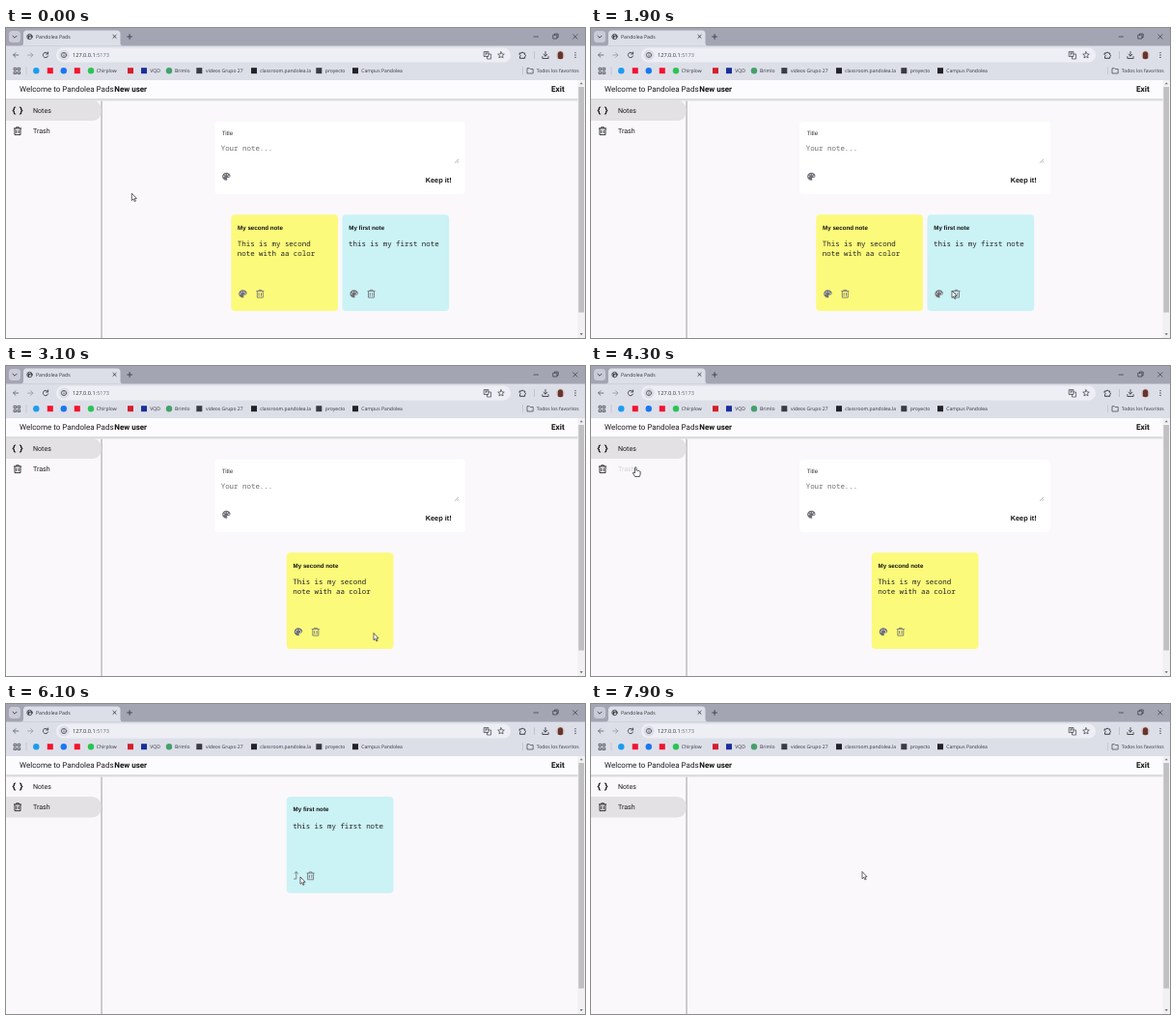
Animation, 600 px wide and 321 px high, one loop 8000 ms. Source, as an HTML page:

```html
<!DOCTYPE html>
<html lang="en">
<head>
<meta charset="utf-8">
<title>Notes demo</title>
<style>
  html, body { margin: 0; width: 100%; height: 100%; overflow: hidden; background: #faf8fb; }
  svg { display: block; width: 100%; height: 100%; }
  text { text-rendering: geometricPrecision; white-space: pre; }
  .ui { font: 5.05px "Open Sans", sans-serif; fill: #30313a; }
  .app { font: 8px Roboto, sans-serif; fill: #1d1b20; }
  .nav { font: 7.1px Roboto, sans-serif; fill: #1d1b20; }
  .bold { font-weight: 700; fill: #111; }
  .head { font: 700 6.2px "Liberation Sans", Arial, sans-serif; fill: #111; }
  .mono { font: 7.45px "Noto Sans Mono", monospace; fill: #222; }
  .line { fill: none; stroke: #3c3d46; stroke-width: .9; stroke-linecap: round; stroke-linejoin: round; }
  .icon { color: #6f6f76; }
</style>
</head>
<body>
<svg viewBox="0 0 600 321" preserveAspectRatio="none">
  <defs>
    <g id="palette">
      <path d="M0-4C-2.4-4-4.2-2.2-4.2 0S-2.3 4 0 4C1.2 4 1.2 3 .8 2.4C.4 1.6 1 1.1 1.8 1.1H2.5C3.7 1.1 4.2.3 4.2-.5C4.2-2.5 2.3-4 0-4Z" fill="currentColor"/>
      <g fill="#fff"><circle cx="-2.5" cy="-.1" r=".65"/><circle cx="-1.2" cy="-2" r=".65"/><circle cx="1.2" cy="-2" r=".65"/><circle cx="2.6" cy="-.3" r=".65"/></g>
    </g>
    <g id="bin" fill="none" stroke="currentColor" stroke-width=".85">
      <path d="M-4-2.9H4M-1.4-3V-4H1.4V-3M-3-2.8V3.8H3V-2.8M-1.2-1.2V2.3M1.2-1.2V2.3"/>
    </g>
    <g id="restore" fill="none" stroke="currentColor" stroke-width=".85">
      <path d="M-2 3.6H.7V-3.8M-1.3-1.8L.7-3.9L2.7-1.8"/>
    </g>
    <g id="arrow">
      <path d="M0 0V7.4L1.7 5.9L2.9 8.5L4.1 8L2.9 5.4H5.1Z" fill="#fff" stroke="#33333b" stroke-width=".75" stroke-linejoin="round"/>
    </g>
    <g id="hand">
      <path d="M-.8 .5Q0-.8 .8 .5V3.6L1.4 3.2L2.3 3.8L3.1 3.5L3.9 4.2Q4.9 3.9 4.9 5V7.4L4 9.8H-.6L-2.7 6.3Q-2.9 5-1.6 5.4L-.8 6.2Z" fill="#fff" stroke="#222229" stroke-width=".75" stroke-linejoin="round"/>
    </g>
  </defs>

  <rect width="600" height="321" fill="#faf8fb"/>

  <!-- tab strip -->
  <rect width="600" height="19" fill="#a3a5b3"/>
  <rect x="3" y="3" width="12" height="12" rx="3.5" fill="#c9cbd6"/>
  <path class="line" d="M7 8.2L9 10.2L11 8.2"/>
  <path d="M15 18.5Q18 18.5 18 15.5V6Q18 2.5 21.5 2.5H115Q118.500 2.5 118.500 6V15.5Q118.500 18.500 121.500 18.500Z" fill="#dddfe8"/>
  <circle class="line" cx="24.500" cy="9" r="2.700"/>
  <path d="M22.500 8L24 7.200L25 8.400L24 10L24.300 11.400L23 10.500ZM25.300 6.700L27 8L26.400 10L25.400 9.200Z" fill="#3c3d46"/>
  <text class="ui" x="31" y="11" style="font-size:5.2px">Pandolea Pads</text>
  <path class="line" d="M110.900 7.200L114.100 10.400M114.100 7.200L110.900 10.400M125.700 9H130.500M128.100 6.600V11.400"/>
  <path class="line" d="M547 9H551.500M567.200 7.200H571V11H567.200ZM568.500 7V6H572.200V9.700H571.200M587.600 6.700L592 11.100M592 6.700L587.600 11.100" style="stroke-width:.75"/>

  <!-- toolbar -->
  <rect y="18.500" width="600" height="35.200" fill="#dddfe8"/>
  <rect x="52" y="20.500" width="471" height="15" rx="7.500" fill="#eeeff5"/>
  <path class="line" d="M12.800 28H7.600M9.900 25.700L7.600 28L9.900 30.300" style="stroke:#666873"/>
  <path class="line" d="M22.700 28H27.900M25.600 25.700L27.900 28L25.600 30.300" style="stroke:#9a9ca8"/>
  <path class="line" d="M43.200 26.300A2.700 2.700 0 1 0 43.600 29M43.600 25V27H41.600"/>
  <circle cx="60" cy="28" r="5.600" fill="#dcdee7"/>
  <circle class="line" cx="60" cy="28" r="2.600" style="stroke-width:.7"/>
  <path class="line" d="M60 27.900V29.300M60 26.600V26.700" style="stroke-width:.7"/>
  <text class="ui" x="69" y="30" style="font-size:5.600px">127.0.0.1<tspan fill="#6b6d77">:5173</tspan></text>
  <path class="line" d="M495.600 24.500H500V29.500H495.600ZM500 27H502.600V32H498.500V29.700M496.600 26H499M497.800 26L497 28.200" style="stroke-width:.7"/>
  <path class="line" d="M513 24.700L514 26.900L516.300 27.100L514.500 28.600L515.100 30.900L513 29.700L510.900 30.900L511.500 28.600L509.700 27.100L512 26.900Z" style="stroke-width:.7"/>
  <path class="line" d="M532.500 26H534.200Q535.200 23.700 536.200 26H537.700V27.700Q539.800 28.600 537.700 29.600V31.300H532.500V29.700Q534.200 28.700 532.500 27.700Z" style="stroke-width:1"/>
  <path d="M547.500 24V32" stroke="#c0c2ce"/>
  <path class="line" d="M559 24.500V29M557 27.200L559 29.200L561 27.200M555.900 29.600V31.500H562.100V29.600"/>
  <circle cx="574.500" cy="28" r="4.400" fill="#d6c7c1"/>
  <path d="M571.800 31.500V27Q572 24.300 574.500 24.300T577.200 27V31.500Q574.500 33 571.800 31.500Z" fill="#68342f"/>
  <g fill="#3c3d46"><circle cx="590" cy="25.600" r=".7"/><circle cx="590" cy="28" r=".7"/><circle cx="590" cy="30.400" r=".7"/></g>

  <!-- bookmarks -->
  <path class="line" d="M8.500 41.300H10.700V43.500H8.500ZM12.500 41.300H14.700V43.500H12.500ZM8.500 45.300H10.700V47.500H8.500ZM12.500 45.300H14.700V47.500H12.500Z" style="stroke-width:.8"/>
  <path d="M21 40V48.500M535.500 40V48.500" stroke="#c0c2ce" stroke-width=".8"/>
  <g id="marks"></g>
  <path class="line" d="M540.400 41.700H542.500L543.300 42.500H546.200V47H540.400Z" style="stroke-width:.7"/>
  <text class="ui" x="549.700" y="46">Todos los favoritos</text>

  <!-- page frame -->
  <rect y="53.500" width="600" height="21" fill="#fcfbfd"/>
  <rect y="53.300" width="600" height=".6" fill="#cfd0d9"/>
  <rect x="98.200" y="75" width="1.700" height="246" fill="#c5c3c7"/>
  <rect y="73.400" width="593" height="1.300" fill="#c9c8cc"/>
  <rect y="74.700" width="593" height="1" fill="#e8e6e9"/>
  <text class="app" x="14" y="66">Welcome to Pandolea Pads</text>
  <text class="app bold" x="112.300" y="66">New user</text>
  <text class="app bold" x="565" y="66" style="font-size:8.200px">Exit</text>
  <rect x="592.500" y="54" width="7.500" height="267" fill="#f1f0f2"/>
  <rect x="593.300" y="61" width="5.700" height="233.500" fill="#c0bfc2"/>
  <path d="M594.600 58.200L596.200 56.300L597.800 58.200Z" fill="#77777c"/>
  <path d="M594.600 316.200L596.200 318.100L597.800 316.200Z" fill="#55555a"/>

  <!-- side menu -->
  <path id="pick" d="M0 0H88Q98.500 0 98.500 10.700T88 21.400H0Z" fill="#e3e1e4"/>
  <path class="line" d="M9.600 82Q8.300 82 8.300 83.300V84.500L7.200 85.500L8.300 86.500V87.700Q8.300 89 9.600 89M14.400 82Q15.700 82 15.700 83.300V84.500L16.800 85.500L15.700 86.500V87.700Q15.700 89 14.400 89" style="stroke:#151518;stroke-width:1.200"/>
  <use href="#bin" x="12" y="106.800" color="#151518" stroke-width="1.200"/>
  <text class="nav" x="28" y="88">Notes</text>
  <text class="nav" id="trash" x="28" y="109.300">Trash</text>

  <!-- notes page -->
  <g id="form">
    <rect x="216" y="97" width="260" height="75" rx="4" fill="#fff"/>
    <text class="head" x="223.700" y="110.700" style="font-weight:400;fill:#333">Title</text>
    <text class="mono" x="222.700" y="127.300" fill="#6c6c72" style="fill:#6c6c72">Your note...</text>
    <path d="M465.200 139.600L469 135.800M467.500 139.600L469 138.100" stroke="#77777c" stroke-width=".6"/>
    <use class="icon" href="#palette" x="228.300" y="153.800"/>
    <text class="head" x="434.700" y="159.600" style="font-size:7.350px">Keep it!</text>
  </g>
  <g id="second">
    <rect width="110.700" height="99.700" rx="4" fill="#fcfa7b"/>
    <text class="head" x="6.800" y="15.400">My second note</text>
    <text class="mono" x="6.500" y="32.700">This is my second<tspan x="6.500" dy="10.500">note with aa color</tspan></text>
    <use class="icon" href="#palette" x="12.100" y="82"/>
    <use class="icon" href="#bin" x="30" y="82"/>
  </g>
  <g id="first">
    <rect width="110.700" height="99.700" rx="4" fill="#cbf2f5"/>
    <text class="head" x="6.800" y="15.400">My first note</text>
    <text class="mono" x="6.500" y="32.700">this is my first note</text>
    <g id="kept">
      <use class="icon" href="#palette" x="12.100" y="82"/>
      <use class="icon" href="#bin" x="30" y="82"/>
    </g>
    <g id="binned">
      <use class="icon" href="#restore" x="9.300" y="81.500"/>
      <use class="icon" href="#bin" x="24.800" y="82"/>
    </g>
  </g>

  <use id="cursor" href="#arrow"/>
</svg>
<script>
  const $ = id => document.getElementById(id);
  const LOOP = 8000, STEP = 100;
  const REMOVE = 2700, OPEN_TRASH = 4400, ERASE = 7500;

  // icon x, colour, shape, label x, label
  const marks = [
    [31.3, '#1d9bf0', 'o'], [45.8, '#f3122f', 's'], [59.8, '#1877f2', 'o'], [73.8, '#f3122f', 's'],
    [88, '#2bc454', 'o', 93.8, 'Chirplow'], [129, '#d31f2b', 's'],
    [143, '#1a2f9c', 's', 149.3, 'VQD'], [169, '#45a06c', 'o', 175, 'Brimlo'],
    [200.3, '#3b3b42', 's', 207, 'videos Grupo 27'],
    [257, '#222228', 's', 263.2, 'classroom.pandolea.la'],
    [324.3, '#3a3a40', 's', 330.8, 'proyecto'], [362, '#222228', 's', 368.3, 'Campus Pandolea']
  ];
  $('marks').innerHTML = marks.map(([x, color, shape, tx, label]) =>
    (shape === 'o'
      ? `<circle cx="${x}" cy="44.200" r="3.200" fill="${color}"/>`
      : `<rect x="${x - 3}" y="41.200" width="6" height="6" fill="${color}"/>`) +
    (label ? `<text class="ui" x="${tx}" y="46">${label}</text>` : '')).join('');

  // time, x, y of the pointer
  const path = [
    [0, 130.3, 171.2], [200, 130.3, 171.2], [900, 352, 269], [1400, 376, 276],
    [1900, 374, 272], [2700, 376, 273], [3100, 381, 276.5], [3300, 379, 274],
    [4100, 46, 104.5], [4500, 46.5, 105], [5000, 102, 115.5], [5400, 262, 170],
    [5800, 305, 179], [6300, 305, 179], [6800, 315, 177], [7500, 315, 177],
    [7800, 281, 173.5], [8000, 281, 173.5]
  ];

  function pointer(t) {
    const i = path.findIndex(p => p[0] > t);
    const [t0, x0, y0] = path[i - 1], [t1, x1, y1] = path[i];
    const u = (t - t0) / (t1 - t0), k = u * u * (3 - 2 * u);
    return [x0 + (x1 - x0) * k, y0 + (y1 - y0) * k];
  }

  const show = (id, on) => $(id).setAttribute('display', on ? 'inline' : 'none');
  const move = (id, x, y) => $(id).setAttribute('transform', `translate(${x} ${y})`);

  function draw(t) {
    const inTrash = t >= OPEN_TRASH, removed = t >= REMOVE;
    const [x, y] = pointer(t);
    const hover = x < 103 && y > 96 && y < 117.5;

    show('form', !inTrash);
    show('second', !inTrash);
    show('first', inTrash ? t < ERASE : !removed);
    show('kept', !inTrash);
    show('binned', inTrash);
    move('second', removed ? 290.8 : 233.3, 193.3);
    move('first', inTrash ? 290.8 : 348.5, inTrash ? 96 : 193.3);
    move('pick', 0, inTrash ? 96 : 74.7);
    $('trash').style.fill = hover ? '#d5d3d6' : '';
    $('cursor').setAttribute('href', hover ? '#hand' : '#arrow');
    move('cursor', x, y);
  }

  function tick() {
    draw(Math.floor(performance.now() % LOOP / STEP) * STEP);
    requestAnimationFrame(tick);
  }
  tick();
</script>
</body>
</html>
```
